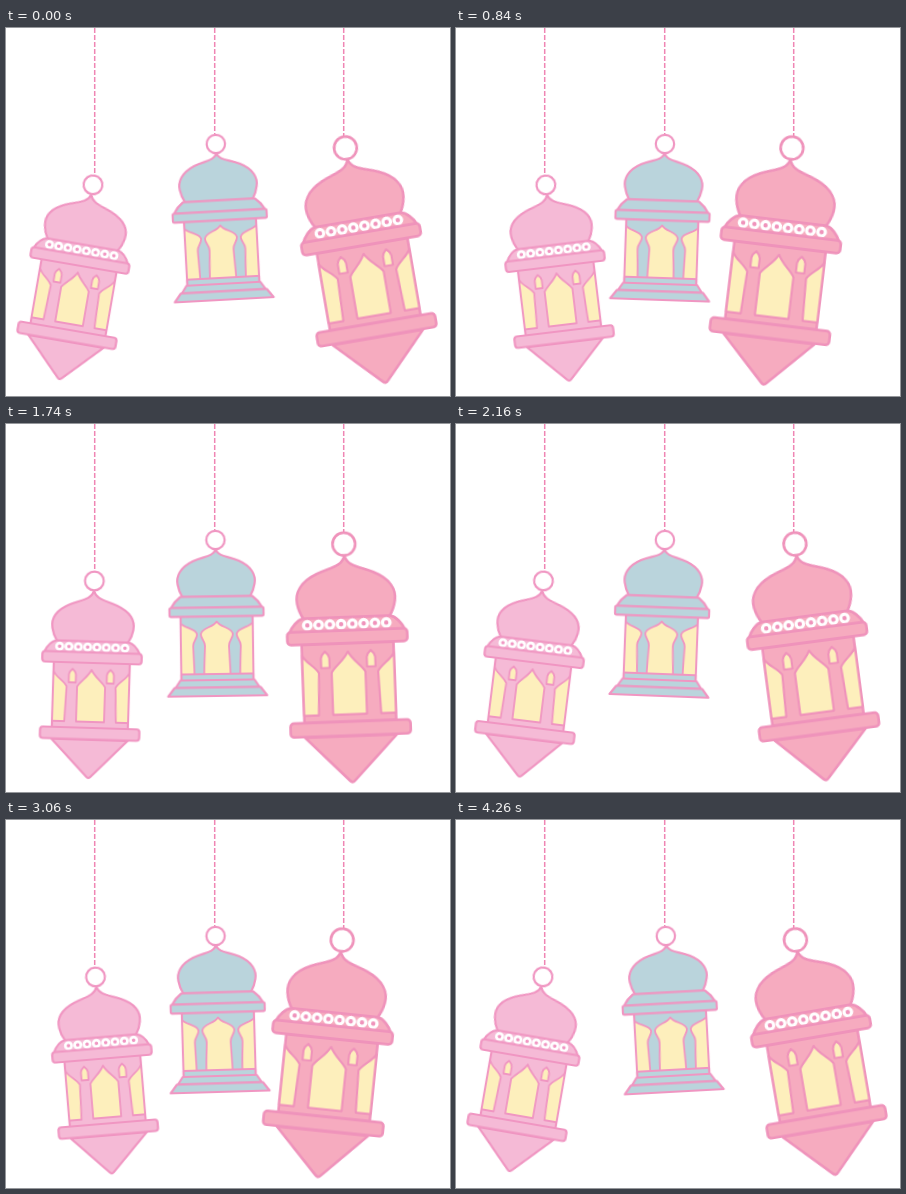
These frames come from a looping animation (444 by 368 pixels, 4.32 s). An HTML page without scripts:

```html
<!DOCTYPE html>
<html lang="en">
<head>
<meta charset="utf-8">
<title>Swinging lanterns</title>
<style>
  html, body { margin: 0; width: 100%; height: 100%; overflow: hidden; background: #fff; }
  svg { display: block; width: 444px; height: 368px; }

  .line { stroke: var(--line); stroke-width: 2.2; stroke-linejoin: round; fill: var(--fill); }
  .ring { fill: none; }
  .glow { fill: #fdefbc; stroke-width: 1.8; }
  .string { stroke: #ef86b4; stroke-width: 1.5; stroke-dasharray: 5 2; }
  .bead { fill: none; stroke-linecap: round; stroke-dasharray: 0 9.34; }
  .pearl { stroke: #fff; stroke-width: 9; }
  .hole { stroke: var(--line); stroke-width: 3.6; }

  .rose  { --fill: #f5bad6; --line: #f096c2; }
  .blue  { --fill: #bad4dc; --line: #f096c2; }
  .coral { --fill: #f6abbf; --line: #ef93bb; }

  .swing { animation: 4320ms cubic-bezier(.37, 0, .63, 1) infinite; }
  .rose .swing  { animation-name: rose; }
  .blue .swing  { animation-name: blue; }
  .coral .swing { animation-name: coral; }

  @keyframes rose {
    0%, 98.61%, 100% { transform: rotate(9.8deg); }
    25% { transform: rotate(-9deg); }
    50% { transform: rotate(7deg); }
    75% { transform: rotate(-5.6deg); }
  }
  @keyframes coral {
    0%, 98.61%, 100% { transform: rotate(-9.7deg); }
    25% { transform: rotate(9deg); }
    50% { transform: rotate(-7.5deg); }
    75% { transform: rotate(6.8deg); }
  }
  @keyframes blue {
    0%, 98.61%, 100% { transform: rotate(-3.1deg); }
    16.67% { transform: rotate(2.2deg); }
    34.72% { transform: rotate(-2.1deg); }
    50% { transform: rotate(2.2deg); }
    67.13% { transform: rotate(-2.2deg); }
    83.33% { transform: rotate(2deg); }
  }
</style>
</head>
<body>
<svg viewBox="0 0 444 368">
  <defs>
    <!-- Lanterns hang from 0,0 -->
    <g id="side">
      <path class="line glow" d="M-38 101C-35.500 107 -28 110 -24.500 116L-25.800 151H-38Z"/>
      <path class="line glow" d="M-22.500 112V104Q-22 101 -19 98.500Q-16 101 -15.500 104V112Z"/>
    </g>
    <g id="pointed">
      <circle class="line ring" cy="10" r="9.4"/>
      <path class="line" d="M-38 169H38L2 206Q0 208 -2 206Z"/>
      <path class="line" d="M-38 92H38V157H-38Z"/>
      <use href="#side"/>
      <use href="#side" transform="scale(-1 1)"/>
      <path class="line glow" d="M-14 151V116C-10.500 110 -4 107 0 99C4 107 10.500 110 14 116V151Z"/>
      <rect class="line" x="-49.700" y="157" width="99.400" height="11.500" rx="3"/>
      <path class="line" d="M0 20C3 29 12 29 23.500 34C37 40 42 49 40.500 58C39.500 64 37.500 68 35.500 71H-35.500C-37.500 68 -39.500 64 -40.500 58C-42 49 -37 40 -23.500 34C-12 29 -3 29 0 20Z"/>
      <path class="line" d="M-36 70.500H36C41 71.500 45.500 77 47.800 82H-47.800C-45.500 77 -41 71.500 -36 70.500Z"/>
      <path class="bead pearl" d="M-32.700 76.200H33"/>
      <path class="bead hole" d="M-32.700 76.200H33"/>
      <rect class="line" x="-49.700" y="81.500" width="99.400" height="10.500" rx="3"/>
    </g>

    <path id="half" class="line glow" d="M-36 93C-32 98 -21 98 -19.800 104C-19.800 109 -23.800 110 -23.800 116L-22.800 144H-36Z"/>
    <g id="flat">
      <circle class="line ring" cy="10" r="9.2"/>
      <path class="line" d="M-36 86H36V150H-36Z"/>
      <use href="#half"/>
      <use href="#half" transform="scale(-1 1)"/>
      <path class="line glow" d="M0 91.500C4 98 15 97 16 104C16 109 12 110 12 116L13.200 144H-13.200L-12 116C-12 110 -16 109 -16 104C-15 97 -4 98 0 91.500Z"/>
      <path class="line" d="M-36 144H36V150H-36Z"/>
      <path class="line" d="M-37 150H37L42 157.500H-42Z"/>
      <path class="line" d="M-43 157.500H43L49.500 166H-49.500Z"/>
      <path class="line" d="M0 19.500C3 27 12 26 23 31C36 37 40 46 38.500 54C37.500 60 36 63 34 66.500H-34C-36 63 -37.500 60 -38.500 54C-40 46 -36 37 -23 31C-12 26 -3 27 0 19.500Z"/>
      <path class="line" d="M-36 66.500H36Q42 71 45.500 77.500H-45.500Q-42 71 -36 66.500Z"/>
      <rect class="line" x="-47" y="77.500" width="94" height="8.800" rx="1.500"/>
    </g>
  </defs>

  <path class="string" d="M88.700 0V147M208.700 0V106M337.700 0V108"/>

  <g class="rose" transform="translate(88.700 147)">
    <g class="swing"><use href="#pointed"/></g>
  </g>
  <g class="blue" transform="translate(209.300 106)">
    <g class="swing"><use href="#flat"/></g>
  </g>
  <g class="coral" transform="translate(337.400 108)">
    <g class="swing"><use href="#pointed" transform="scale(1.208)"/></g>
  </g>
</svg>
</body>
</html>
```
